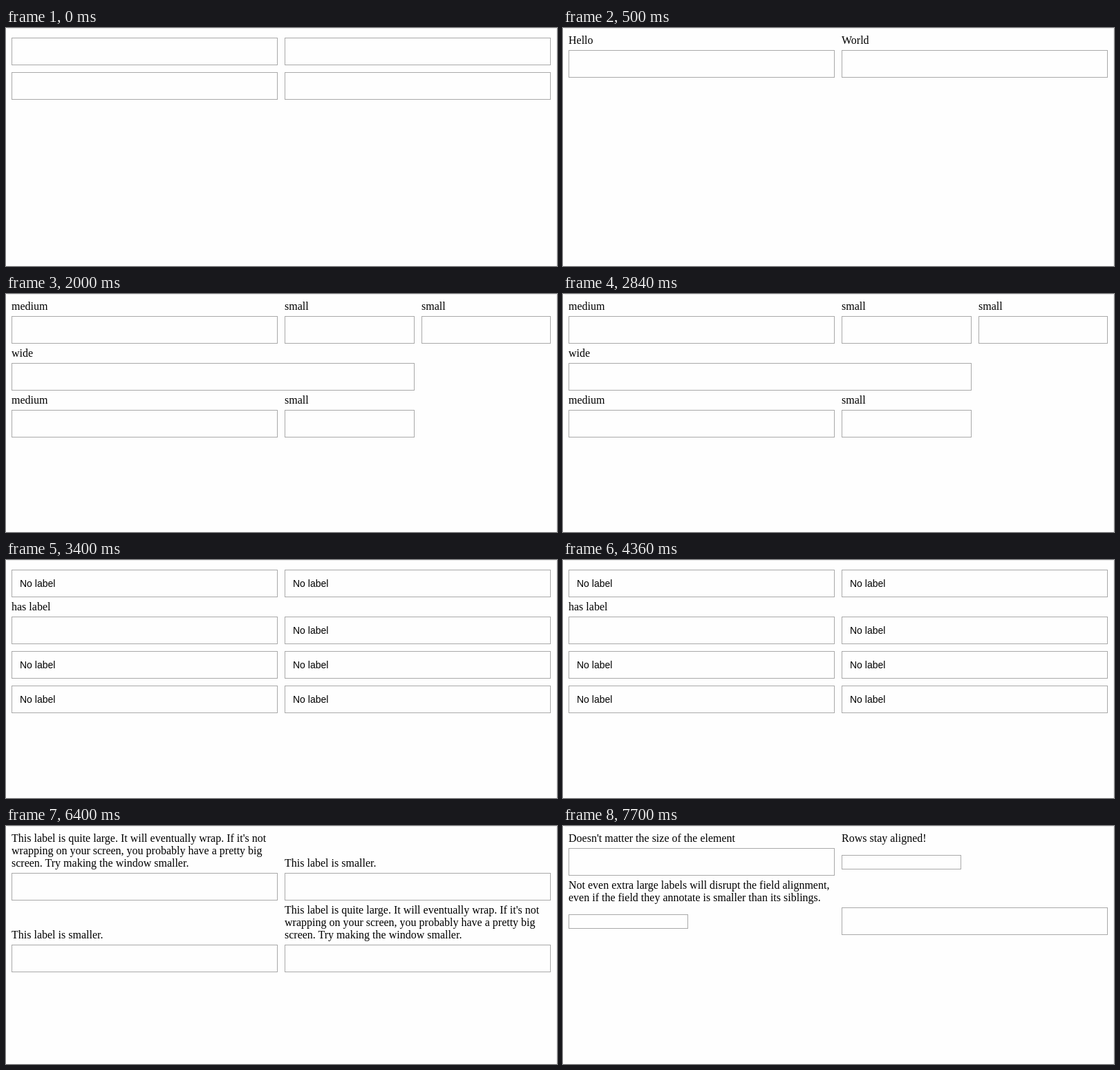
Recreate the animation shown at these times as an HTML page. Size 797 by 345 pixels, loop 8000 ms.

```html
<!DOCTYPE html>
<html lang="en">
<head>
<meta charset="utf-8">
<title>Form layouts</title>
<style>
  html, body { margin: 0; width: 100%; height: 100%; overflow: hidden; background: #fefefe; }
  svg { display: block; width: 797px; height: 345px; }
  rect { fill: #fefefe; stroke: #a9a9a9; }
  text { fill: #000; font: 16px "Liberation Serif", "Times New Roman", serif; }
  .value { font: 14px "Liberation Sans", Arial, sans-serif; }
  .edge { fill: none; stroke: #ebebeb; }
</style>
</head>
<body>
<svg viewBox="0 0 797 345">
  <path class="edge" d="M2 .5H796.5V345"/>
  <g id="stage"></g>
</svg>
<script>
const LEFT = 8, RIGHT = 403, HALF = 385, LINE = 18;
const LOOP = 8000;

const text = (x, y, content, cls = "") =>
  `<text x="${x}" y="${y}" class="${cls}">${content}</text>`;

// A bordered field; label lines stack upwards from `gap` above its top edge.
function field(x, y, { label = "", value = "", w = HALF, h = 40, gap = 9 } = {}) {
  const lines = label ? label.split("\n") : [];
  return `<rect x="${x + .5}" y="${y + .5}" width="${w - 1}" height="${h - 1}"/>` +
    lines.map((s, i) => text(x, y - gap - LINE * (lines.length - 1 - i), s)).join("") +
    (value && text(x + 12, y + 25, value, "value"));
}

const pair = (y, left, right) => field(LEFT, y, left) + field(RIGHT, y, right);

const empty = { value: "No label" };
const medium = { label: "medium" };
const small = { label: "small", w: 188 };
const short = { label: "This label is smaller." };
const long = {
  label: "This label is quite large. It will eventually wrap. If it's not\n" +
    "wrapping on your screen, you probably have a pretty big\n" +
    "screen. Try making the window smaller."
};
const compact = label => ({ label, w: 173, h: 21, gap: 19 });

const scenes = [
  { start: 0, markup: pair(14) + pair(64) },
  { start: 500, markup: pair(32, { label: "Hello" }, { label: "World" }) },
  { start: 2000, markup:
    pair(32, medium, small) + field(601, 32, { ...small, w: 187 }) +
    field(LEFT, 100, { label: "wide", w: 583 }) +
    pair(168, medium, small) },
  { start: 3400, markup:
    pair(14, empty, empty) + pair(82, { label: "has label" }, empty) +
    pair(132, empty, empty) + pair(182, empty, empty) },
  { start: 5000, markup:
    field(LEFT, 65, { label: "much roomier", w: 380, gap: 42 }) +
    field(408, 65, { w: 380 }) +
    field(LEFT, 199, { label: "such space", w: 780, gap: 42 }) },
  { start: 6400, markup: pair(68, long, short) + pair(172, short, long) },
  { start: 7700, markup:
    field(LEFT, 32, { label: "Doesn't matter the size of the element" }) +
    field(RIGHT, 42, compact("Rows stay aligned!")) +
    field(LEFT, 128, compact("Not even extra large labels will disrupt the field alignment,\n" +
      "even if the field they annotate is smaller than its siblings.")) +
    field(RIGHT, 118) }
];

const stage = document.getElementById("stage");
let shown;

function render(time) {
  const scene = scenes.findLast(s => s.start <= time % LOOP);
  if (scene !== shown) stage.innerHTML = (shown = scene).markup;
}

const origin = performance.now();
function tick() {
  render(performance.now() - origin);
  requestAnimationFrame(tick);
}
tick();
</script>
</body>
</html>
```
